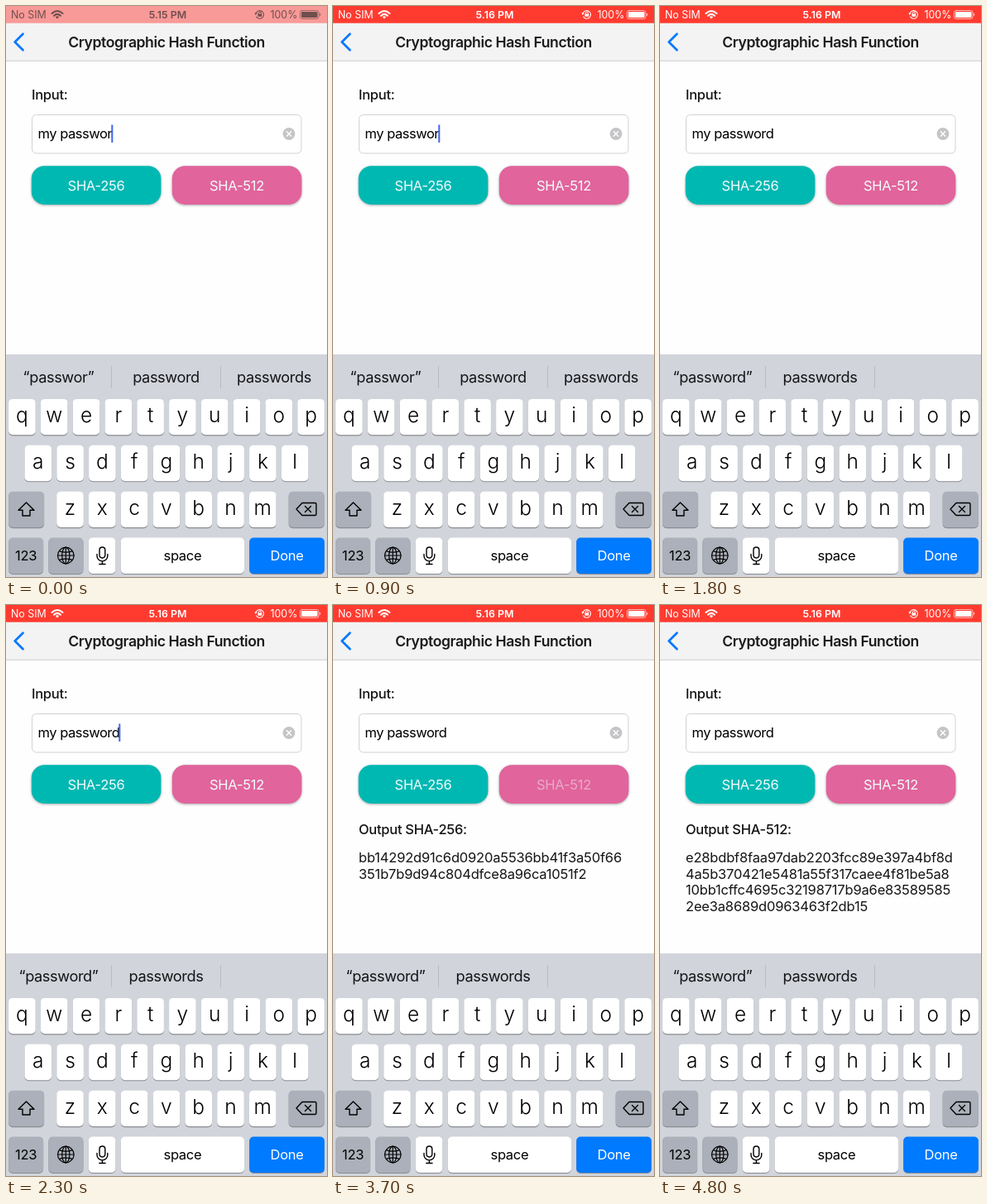
Animation of 388x690 px, one loop 4900 ms. Source, as an HTML page:

```html
<!DOCTYPE html>
<html lang="en">
<head>
<meta charset="utf-8">
<title>Cryptographic Hash Function</title>
<style>
html, body { margin: 0; width: 100%; height: 100%; overflow: hidden; background: #fff; }
svg { display: block; font-family: Inter, Roboto, sans-serif; }
text { white-space: pre; }
.mid { text-anchor: middle; }
.body { font-size: 16.55px; letter-spacing: -.3px; }
.field { letter-spacing: -.5px; }
.digest { letter-spacing: -.2px; }
.key { font-size: 24.5px; font-weight: 300; }
.hint { font-size: 18.2px; letter-spacing: -.4px; fill: #151517; }
.line { fill: none; stroke-linecap: round; stroke-linejoin: round; }
</style>
</head>
<body>
<svg width="388" height="690" viewBox="0 0 388 690">
  <rect width="388" height="690" fill="#fefefe"/>

  <rect y="20" width="388" height="46" fill="#f3f3f3"/>
  <path d="M0 66.3H388" stroke="#c0c0c2" stroke-width=".8"/>
  <path class="line" d="M20.5 33.7L10.7 43.5L20.5 53.3" stroke="#0a7aff" stroke-width="2.8"/>
  <text class="mid" x="194" y="49.7" font-size="17.6" font-weight="600" letter-spacing="-.43" fill="#1b1b1d">Cryptographic Hash Function</text>

  <rect id="bar" width="388" height="20.7"/>
  <g id="status" fill="currentColor" font-size="12.4">
    <text x="6" y="15">No SIM</text>
    <text id="clock" class="mid" x="195.5" y="15" font-weight="600"></text>
    <text x="319.5" y="15">100%</text>
    <g class="line" stroke="currentColor" stroke-width="2" stroke-linecap="butt">
      <path d="M55.5 9Q62 3 68.5 9M58 11.7Q62 8 66 11.7"/>
      <path d="M302.2 8.6A4.8 4.8 0 1 1 302.6 13" stroke-width="1.1"/>
      <path d="M305.2 9.5V8.8a1.6 1.6 0 0 1 3.2 0V9.5" stroke-width="1"/>
      <rect x="355.5" y="5.5" width="22.5" height="10" rx="2.5" stroke-width="1" opacity=".65"/>
    </g>
    <path d="M59.8 13.2Q62 11.2 64.2 13.2L62 15.5ZM304.4 9.4h4.8v3.4h-4.8ZM300.4 8.2l3.4 .2l-2 2.5Z"/>
    <rect x="357" y="7" width="19.5" height="7" rx="1.2"/>
    <path d="M379.3 8.6q2 1.9 0 3.8Z"/>
  </g>

  <g class="body" fill="#151517">
    <text x="31" y="113" font-weight="500">Input:</text>
    <rect x="31.5" y="131.5" width="325.5" height="46.5" rx="5" fill="#fff" stroke="#d2d2d4"/>
    <text id="field" class="field" x="38.5" y="159.5" fill="#000"></text>
    <rect id="caret" y="143.5" width="2" height="21.5" fill="#4166ee"/>
    <circle cx="342" cy="154.5" r="7.4" fill="#c5c5c8"/>
    <path class="line" d="M339.3 151.8l5.4 5.4m0-5.4l-5.4 5.4" stroke="#fff" stroke-width="1.4"/>
    <g id="buttons"></g>
    <text id="heading" x="31" y="277" font-weight="500"></text>
    <g id="digest" class="digest"></g>
  </g>

  <rect y="421" width="388" height="269" fill="#d1d4da"/>
  <path d="M127.5 435V462M259.5 435V462" stroke="#b9bcc3"/>
  <g id="hints"></g>
  <g id="keys" fill="#000"></g>
  <g class="line" stroke="#000" stroke-width="1.4">
    <path d="M24.5 600L34 609.3H29V616H20V609.3H15Z"/>
    <path d="M358 600.5H373.5Q375 600.5 375 602V614Q375 615.5 373.5 615.5H358L351 608ZM361.5 604.5l7 7m0-7l-7 7"/>
    <g stroke-width="1.2">
      <circle cx="72.3" cy="664" r="9.8"/>
      <ellipse cx="72.3" cy="664" rx="4.6" ry="9.8"/>
      <path d="M72.3 654.2V673.8M62.5 664H82.1M64.5 658.6Q72.3 661.8 80.1 658.6M64.5 669.4Q72.3 666.2 80.1 669.4"/>
    </g>
    <rect x="113" y="654" width="6.8" height="13" rx="3.4"/>
    <path d="M110 662.5V664.5a6.4 6.4 0 0 0 12.8 0V662.5M116.4 671V674.5M112.8 674.5H120"/>
  </g>
</svg>
<script>
const LOOP = 4900;
const TYPED = 1050;
const $ = id => document.getElementById(id);
const clamp = v => Math.max(0, Math.min(1, v));
const ramp = (t, start, length) => clamp((t - start) / length);
const mix = (a, b, p) => `rgb(${a.map((v, i) => Math.round(v + (b[i] - v) * p))})`;

function add(parent, tag, attrs, content = '') {
  const el = document.createElementNS('http://www.w3.org/2000/svg', tag);
  for (const name in attrs) el.setAttribute(name, attrs[name]);
  el.textContent = content;
  return parent.appendChild(el);
}

// Keyboard
const rowY = row => 474.9 + row * 55.87;

function key(x, row, width, label, { fill = '#fff', color = '#000', size = 'body', drop = 5.5 } = {}) {
  const y = rowY(row), height = 43.4;
  add($('keys'), 'rect', { x, y: y + 1.1, width, height, rx: 5, fill: '#898b90' });
  add($('keys'), 'rect', { x, y, width, height, rx: 5, fill });
  add($('keys'), 'text', { class: size + ' mid', x: x + width / 2, y: y + height / 2 + drop, fill: color }, label);
}
const gray = { fill: '#abb0ba' };
[['qwertyuiop', 3.1], ['asdfghjkl', 22.5], ['zxcvbnm', 61.2]].forEach(([letters, x], row) =>
  [...letters].forEach((c, i) => key(x + i * 38.8, row, 32.6, c, { size: 'key', drop: 6.7 })));
key(3.1, 2, 43, '', gray);
key(341.7, 2, 43, '', gray);
key(3.1, 3, 42, '123', gray);
key(51.4, 3, 42, '', gray);
key(99.8, 3, 32.6, '');
key(138.8, 3, 149.2, 'space');
key(294.2, 3, 90.7, 'Done', { fill: '#007aff', color: '#fff' });

// Buttons
const labels = [['SHA-256', 30.8, '#00b8b2'], ['SHA-512', 200.8, '#e1649c']].map(([name, x, fill]) => {
  add($('buttons'), 'rect', { x, y: 193.3, width: 156.6, height: 46.6, rx: 15.5, fill,
    style: 'filter:drop-shadow(0 1.5px 1.5px rgba(0,0,0,.32))' });
  return add($('buttons'), 'text', { class: 'mid', x: x + 78.2, y: 222.5, fill: '#f4fbfb' }, name);
});

const hashes = {
  'SHA-256': ['bb14292d91c6d0920a5536bb41f3a50f66', '351b7b9d94c804dfce8a96ca1051f2'],
  'SHA-512': ['e28bdbf8faa97dab2203fcc89e397a4bf8d', '4a5b370421e5481a55f317caee4f81be5a8',
    '10bb1cffc4695c32198717b9a6e83589585', '2ee3a8689d0963463f2db15'],
};
const lines = [0, 1, 2, 3].map(i => add($('digest'), 'text', { x: 31, y: 311 + i * 19.7 }));

// Suggestions: single letters grow in or shrink away
const hints = [63.5, 193.5, 324].map(x => add($('hints'), 'text', { class: 'hint mid', x, y: 454.5 }));
const letter = (hint, c, size, alpha, dx = 0) =>
  add(hint, 'tspan', { style: `font-size:${18.2 * size}px`, 'fill-opacity': alpha, dx }, c);

function drawHints(p) {
  hints.forEach(h => h.textContent = '');
  const [quoted, plural, last] = hints;
  const grow = (hint, c) => p > 0 && letter(hint, c, .4 + .6 * p, clamp(p * 1.5));
  letter(quoted, '“passwor', 1, 1);
  grow(quoted, 'd');
  letter(quoted, '”', 1, 1);
  letter(plural, 'password', 1, 1);
  grow(plural, 's');
  if (p === 0) letter(last, 'passwords', 1, 1);
  else if (p < 1) [...'passwords'].forEach((c, i) => {
    const alpha = clamp(1.15 - p * (1 + i * .16));
    const size = .75 + .25 * alpha;
    letter(last, c, size, alpha, (1 - size) * 9);
  });
}

const press = (t, down, up) => 1 - .8 * (ramp(t, down, 150) - ramp(t, up, 250));

// The blink restarts when a letter is typed
function caretAlpha(t) {
  const fadeStart = t < TYPED ? 50 : 1250;
  const phase = (t - fadeStart + 1100) % 1100;
  return 1 - ramp(phase, 0, 250) + ramp(phase, 600, 250);
}

function draw(t) {
  const red = ramp(t, 0, 500);
  $('bar').setAttribute('fill', mix([248, 154, 151], [255, 59, 48], red));
  $('status').style.color = mix([112, 78, 78], [255, 255, 255], red);
  $('clock').textContent = t < 500 ? '5.15 PM' : '5.16 PM';

  const typed = t >= TYPED;
  $('field').textContent = typed ? 'my password' : 'my passwor';
  $('caret').setAttribute('x', typed ? 136.3 : 127.3);
  $('caret').setAttribute('opacity', caretAlpha(t));
  drawHints(ramp(t, 1100, 240));

  labels[0].setAttribute('opacity', press(t, 2350, 2700));
  labels[1].setAttribute('opacity', press(t, 3600, 3900));
  const method = t < 2700 ? '' : t < 3880 ? 'SHA-256' : 'SHA-512';
  $('heading').textContent = method && `Output ${method}:`;
  lines.forEach((line, i) => line.textContent = hashes[method]?.[i] ?? '');
}

const start = performance.now();
function tick() {
  draw((performance.now() - start) % LOOP);
  requestAnimationFrame(tick);
}
tick();
</script>
</body>
</html>
```
